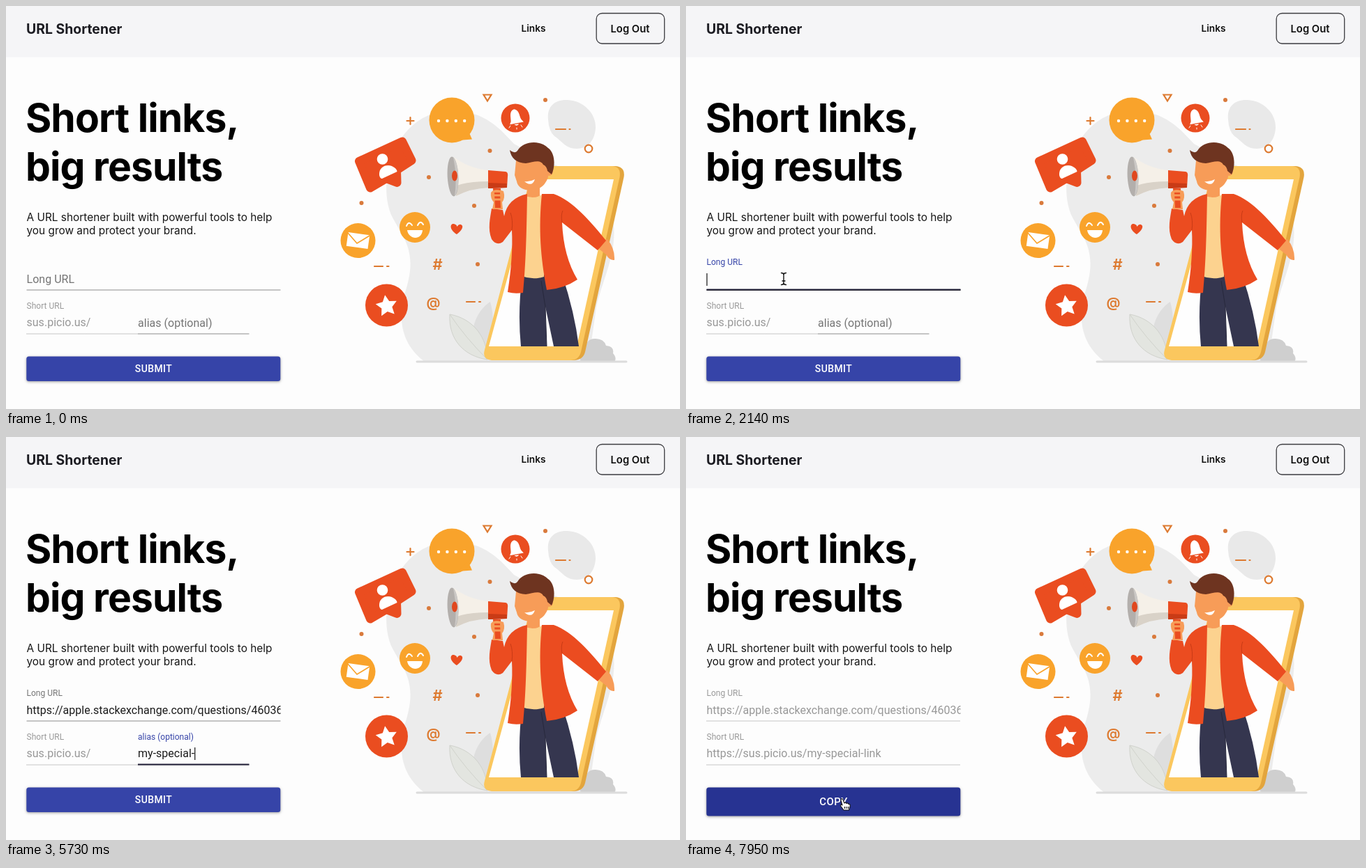
An HTML page that plays this animation: 966x579 px, repeating every 8000 ms.

```html
<!DOCTYPE html>
<html lang="en">
<head>
<meta charset="utf-8">
<title>URL Shortener</title>
<style>
  html, body { margin: 0; width: 100%; height: 100%; overflow: hidden; background: #fdfdfd; }
  svg { display: block; width: 966px; height: 579px; }
  text { font: 16px Roboto, sans-serif; letter-spacing: .02px; white-space: pre; }
  .inter { font-family: Inter, sans-serif; font-weight: 600; letter-spacing: 0; font-optical-sizing: none; fill: #111; }
  .title { font-size: 57px; font-weight: 700; letter-spacing: -.95px; fill: #000; }
  .lead { font-size: 15.4px; font-weight: 400; fill: #161616; }
  .small { font-size: 12px; fill: #999; }
  .cap { font-weight: 500; letter-spacing: .4px; fill: #fff; text-anchor: middle; }
  .sign { font: 600 22px Inter, sans-serif; fill: #dd7a30; text-anchor: middle; }
  .dots { stroke: #8c8c8c; stroke-dasharray: 1 1; }
  #button { filter: drop-shadow(0 1px 2px rgba(0, 0, 0, .25)) drop-shadow(0 1.5px 1px rgba(0, 0, 0, .15)); }
</style>
</head>
<body>
<svg viewBox="0 0 966 579">
  <defs><clipPath id="field"><path d="M29 375H393.500V406H29Z"/></clipPath></defs>
  <path fill="#f5f5f7" d="M0 0H966V73.500H0Z"/>
  <text class="inter" x="29" y="39.500" style="font-size:19.400px;font-weight:700;fill:#1c1c22">URL Shortener</text>
  <text class="inter" x="738.500" y="36.500" style="font-size:13.700px">Links</text>
  <rect x="846.200" y="10.500" width="97.500" height="43.500" rx="8" fill="none" stroke="#3c3c40" stroke-width="1.300"/>
  <text class="inter" x="866.500" y="37.500" style="font-size:14.800px">Log Out</text>
  <text class="inter title" x="28" y="181">Short links,</text>
  <text class="inter title" x="28" y="250.500">big results</text>
  <text class="inter lead" x="29.500" y="309">A URL shortener built with powerful tools to help</text>
  <text class="inter lead" x="29.500" y="328">you grow and protect your brand.</text>

  <!-- backdrop -->
  <g fill="#ececec">
    <path d="M600 511C565 485 560 445 574 405C590 350 568 332 552 300C532 250 556 165 622 152C680 143 708 176 728 198C790 232 850 250 868 300C882 350 850 400 845 440L835 511Z"/>
    <path fill="#e9e9e9" d="M777 163C775 143 788 134 805 135C828 136 846 155 845 175C844 194 833 205 818 205C802 205 797 194 786 187Q778 180 777 163Z"/>
    <path fill="#dedede" d="M668 470C672 446 682 433 694 425C700 445 699 470 692 492Z"/>
    <path fill="#e3e5e0" stroke="#d0d2cc" d="M636 443C634 479 656 503 690 508C690 477 670 449 636 443Q658 476 690 508"/>
    <path fill="#cfcfcf" d="M824 511Q818 497 830 493Q832 477 845 478Q857 478 860 488Q872 489 870 499Q876 506 872 511Z"/>
  </g>
  <path d="M589 511H889" stroke="#dcdcdc" stroke-width="3" stroke-linecap="round"/>

  <!-- badges -->
  <g fill="#f9a32b">
    <circle cx="639" cy="164" r="32.500"/>
    <path d="M648 193L668 191.500L662 178Z"/>
    <circle cx="586" cy="318" r="22"/>
    <circle cx="504.500" cy="337" r="25"/>
  </g>
  <g fill="#ea4d20">
    <circle cx="730" cy="161" r="20.500"/>
    <circle cx="545.500" cy="430" r="30.500"/>
    <path stroke="#ea4d20" stroke-width="12" stroke-linejoin="round" d="M506 223L568 194.500L581.500 222L560 236L560.500 254L545 248L522 261.500Z"/>
    <path d="M646 328C634 320 637 312 642 313Q646 314 646.500 317Q649 313 652 314C657 316 653 323 646 328Z"/>
  </g>
  <g fill="#fff">
    <g id="ellipsis"></g>
    <circle cx="539.500" cy="220" r="7.800"/>
    <path d="M535 243C534 231 545 227 553 230Q560 233 560.500 238L539 248Q536 248 535 243Z"/>
    <path transform="rotate(-8 730 161)" d="M730 148C737 150 736 158 738 164L741 168L721 169L723 165C724 158 722 150 730 148ZM727 170H734Q731 174 727 170Z"/>
    <path d="M575 322H597C596 337 577 336 575 322Z"/>
    <path transform="rotate(8 504.500 337)" d="M489 327H520V347H489Z"/>
    <path id="star"/>
  </g>
  <g fill="none" stroke-linecap="round">
    <path d="M574 316Q577 308 582 315M590 315Q594 307 598 314" stroke="#fff" stroke-width="2"/>
    <path d="M490 326L503 341L521 330" stroke="#f9a32b" stroke-width="1.700"/>
    <path d="M723 172L721 175M738 171L740 174M732 175V177" stroke="#fff"/>
    <g stroke="#dd7a30" stroke-width="2.200">
      <path d="M528 374H540M546 374H548.500M660 425H672M678 425H680M788 177H802M807.500 177H808.500M574.500 165H584.500M579.500 160V170M684.500 127.500H695.500L690 136.500Z"/>
      <circle cx="835" cy="205" r="5.300"/>
    </g>
  </g>
  <g id="specks" fill="#d97a3c"></g>
  <text class="sign" x="618.500" y="379">#</text>
  <text class="sign" x="612.500" y="432.500" style="font-size:20px">@</text>

  <!-- phone -->
  <path fill="#e3a53d" d="M765 230H873Q888 231 885.500 246L830 497Q827 509 813 509H700Z"/>
  <path fill="#fbc75e" d="M756 230H869Q882 231 879.500 246L824 497Q821 509 809 509H696Q682 508 686 494Z"/>
  <path fill="#fefefe" d="M757 249H871L818 489H692Z"/>

  <!-- man -->
  <path fill="#35364f" d="M740 386H797Q815 440 821 489H785L773 432L775 489H738Q733 440 740 386Z"/>
  <path d="M773 432L767 395M775 489L773 432" stroke="#27283c"/>
  <path fill="#f79c58" d="M848 340L862 335Q873 349 872 365Q865 366 860 357L851 350ZM748 250H765V279H746Z"/>
  <path fill="#fcd28f" d="M743 272Q756 279 770 270L771 389Q755 394 739 388Z"/>
  <g fill="#eb4c20">
    <path d="M747 270C746 330 745 370 741 412Q729 414 719 411Q727 360 725 322L712 339Q703 345 696 335C690 320 694 304 696 291L712 293L714 302Q719 276 747 270Z"/>
    <path d="M768 270H785C812 279 840 312 860 337L848 351L797 311Q799 360 819 393Q800 406 775 408C766 360 763 320 768 270Z"/>
  </g>
  <path fill="none" stroke="#c93b16" d="M725 322Q727 308 723 297M797 311Q795 300 798 294"/>
  <path fill="#f79c58" d="M731 222Q750 212 776 224L777 246Q771 264 752 265Q734 264 732 252L729 243Z"/>
  <circle cx="778" cy="238" r="6" fill="#f79c58"/>
  <path fill="#6e3420" d="M722 207Q729 213 733 208C741 194 765 192 777 204C788 212 787 232 782 242L776 237Q775 230 770 228C766 220 756 224 745 226Q725 225 722 207Z"/>
  <path fill="#fff" d="M743 252Q751 253 758 249Q754 261 743 252Z"/>

  <!-- megaphone -->
  <path fill="#f5f0e8" d="M642 217Q662 233 692 236V261Q666 261 646 273Z"/>
  <path fill="#d9d2c8" d="M645 273Q666 262 692 261V252Q662 252 646 258Z"/>
  <ellipse cx="640.500" cy="245" rx="7.800" ry="28.500" fill="#b3afac" transform="rotate(-3 640 245)"/>
  <path fill="#cbc8c5" d="M641 217C650 225 651 263 643 273Q647 245 641 217Z"/>
  <ellipse cx="643" cy="244" rx="4" ry="7.500" fill="#e0481f"/>
  <path fill="#ea4d20" d="M691 236L716 238Q720 239 719 245L718 261L691 262ZM698 262H709L710 290H700Z"/>
  <path fill="#c93b16" d="M691 254L718 255V261L691 262Z"/>
  <path fill="#f79c58" d="M695 268Q700 261 713 266Q716 276 711 282L712 292H697L699 282Q694 276 695 268Z"/>
  <path fill="#ea4d20" d="M700 268H708L709 290H701Z"/>
  <path d="M700 272H712M700 278H711" stroke="#f79c58" stroke-width="3"/>

  <!-- form -->
  <text id="longLabel">Long URL</text>
  <text id="longText" x="29.500" y="397.700" clip-path="url(#field)">https://apple.stackexchange.com/questions/460365/</text>
  <path id="longLine"/>
  <path id="longFocus" stroke="#24223a" stroke-width="2"/>
  <text class="small" x="29.500" y="435.300">Short URL</text>
  <text id="shortText" x="29.500" y="460.300" fill="#989898"></text>
  <path id="shortLine" class="dots"/>
  <g id="alias">
    <path d="M189 471H348.500" stroke="#8c8c8c"/>
    <path id="aliasFocus" stroke="#24223a" stroke-width="2"/>
    <text id="aliasLabel">alias (optional)</text>
    <text id="aliasText" x="189" y="460.300" fill="#1c1c1c"></text>
  </g>
  <path id="caret" stroke="#111" stroke-width="1.200"/>
  <rect id="button" x="29.300" y="503.500" width="364" rx="3.500"/>
  <text id="caption" class="cap" x="211.500"></text>

  <g id="pointer" stroke-linejoin="round">
    <g id="beam" fill="none" stroke-linecap="round">
      <path stroke="#fff" stroke-width="3" d="M-3.500 -8.500Q0 -8.500 0 -6Q0 -8.500 3.500 -8.500M0 -6V6M-3.500 8.500Q0 8.500 0 6Q0 8.500 3.500 8.500M-2 3H2"/>
      <path stroke="#111" stroke-width="1.400" d="M-3.500 -8.500Q0 -8.500 0 -6Q0 -8.500 3.500 -8.500M0 -6V6M-3.500 8.500Q0 8.500 0 6Q0 8.500 3.500 8.500M-2 3H2"/>
    </g>
    <g id="hand" fill="#fff" stroke="#111" stroke-width="1.100">
      <path d="M-4 1L-6 -6Q-6 -9 -3.500 -8L-1 -2Q1 -4 2 -1.500Q4 -3 5 -.500Q8 -1 7 3L5.500 8H-2L-6.500 2Q-6.500 -1 -4 1Z"/>
      <path d="M-.500 3V6M2 3V6M4.500 3V6"/>
    </g>
    <path id="arrow" fill="#111" stroke="#fff" d="M0 0V15L3.500 11.800L6 17.500L8.500 16.300L6 11H11Z"/>
  </g>
</svg>
<script>
const $ = id => document.getElementById(id);
const set = (id, attrs) => { for (const k in attrs) $(id).setAttribute(k, attrs[k]); };
const show = (id, on) => set(id, { visibility: on ? 'visible' : 'hidden' });
const clamp = p => Math.max(0, Math.min(1, p));
const easeOut = p => 1 - (1 - clamp(p)) ** 3;
const easeInOut = p => p * p * (3 - 2 * p);

const circles = list => list.map(([x, y, r]) => `<circle cx="${x}" cy="${y}" r="${r}"/>`).join('');
$('ellipsis').innerHTML = circles([0, 1, 2, 3].map(i => [620 + i * 12.4, 165, 2.2]));
$('specks').innerHTML = circles([[773, 135, 3], [693.5, 208, 3], [606, 246, 3], [509.5, 283, 3], [671, 287, 3], [676, 371, 3]]);
const star = Array.from({ length: 10 }, (_, i) => {
  const a = i * Math.PI / 5 - 1.72, r = i % 2 ? 8 : 16;
  return [545.5 + r * Math.cos(a), 431 + r * Math.sin(a)];
});
set('star', { d: 'M' + star.join('L') + 'Z' });

const LOOP = 8000, FOCUS = 1780, PASTE = 2650, NEXT = 3400, HOVER = 7080, DONE = 7450;
const WORD = 'my-special-link';
const KEYS = [4140, 4260, 4400, 4600, 4910, 5030, 5150, 5270, 5390, 5500, 5620, 5740, 5900, 6080, 6250];
// time, x, y
const TRACK = [[860, 262, 470], [1350, 142, 391], [1700, 142, 391], [1800, 140, 392], [2950, 140, 392],
  [3360, 255, 449], [6550, 255, 449], [6750, 249, 453], [6820, 249, 453], [7220, 228, 528]];

function pointerAt(t) {
  const i = TRACK.findIndex(k => k[0] > t);
  if (i < 1) return TRACK[i < 0 ? TRACK.length - 1 : 0].slice(1);
  const [a, b] = [TRACK[i - 1], TRACK[i]];
  const p = easeInOut((t - a[0]) / (b[0] - a[0]));
  return [1, 2].map(j => a[j] + (b[j] - a[j]) * p);
}

const progress = (t, start) => easeOut((t - start) / 200);
const mix = (a, b, p) => `rgb(${a.map((v, i) => Math.round(v + (b[i] - v) * p))})`;
const GREY = [117, 117, 117], BLUE = [54, 68, 168];

function label(id, x, y, lift, tint) {
  set(id, {
    transform: `translate(${x} ${y - 25.4 * lift}) scale(${1 - lift / 4})`,
    fill: mix(GREY, BLUE, tint)
  });
}

function focusLine(id, mid, half, y, p) {
  show(id, p > 0.002);
  set(id, { d: `M${mid - half * p} ${y}H${mid + half * p}` });
}

function draw(t) {
  const [x, y] = pointerAt(t);
  const done = t >= DONE;
  const typing = (t >= PASTE && t < 2950) || (t >= KEYS[0] && t < 6550);
  const visible = t >= TRACK[0][0] && !typing;
  const overLong = visible && y > 377 && y < 409;
  const overAlias = visible && x > 188 && x < 349 && y > 440 && y < 472;
  const overButton = y > 503;

  const first = progress(t, FOCUS), second = progress(t, NEXT), blur = progress(t, DONE);
  label('longLabel', 29.5, 397.7, first, first - second);
  if (done) set('longLabel', { fill: '#999' });
  focusLine('longFocus', 211.5, 182, 407.5, first - second);
  show('longText', t >= PASTE);
  set('longText', { fill: done ? '#989898' : '#1c1c1c' });
  const hot = overLong && !done;
  set('longLine', {
    d: 'M29.5 408H393.5', class: done ? 'dots' : '',
    stroke: hot ? '#4a4a4a' : '#8c8c8c', 'stroke-width': hot ? 1.8 : 1
  });

  const count = KEYS.filter(k => k <= t).length;
  $('aliasText').textContent = WORD.slice(0, count);
  label('aliasLabel', 189, 460.7, second, second - blur);
  focusLine('aliasFocus', 268.75, 79.75, 470.5, second);
  $('alias').style.display = done ? 'none' : '';
  $('shortText').textContent = done ? 'https://sus.picio.us/' + WORD : 'sus.picio.us/';
  set('shortLine', { d: `M29.5 471H${done ? 393.5 : 189}` });

  // The caret restarts its blink after every key.
  const inAlias = t >= NEXT, pasted = t >= PASTE;
  const since = t - (count ? KEYS[count - 1] : inAlias ? NEXT : pasted ? PASTE : FOCUS);
  show('caret', t >= FOCUS && !done && (inAlias || !pasted) && since % 1000 < 500);
  const cx = inAlias ? 189.5 + (count ? $('aliasText').getComputedTextLength() : 0) : 30;
  set('caret', { d: `M${cx} ${inAlias ? 446 : 384}v18` });

  const shade = clamp((t - HOVER) / 250);
  set('button', { height: done ? 41 : 35.5, fill: mix(BLUE, [39, 51, 146], shade) });
  set('caption', { y: done ? 529.3 : 526 });
  $('caption').style.fontSize = done ? '15px' : '14px';
  $('caption').textContent = done ? 'COPY' : 'SUBMIT';

  $('pointer').style.display = visible ? '' : 'none';
  set('pointer', { transform: `translate(${x} ${y})` });
  const text = overLong || overAlias;
  show('beam', text);
  show('hand', overButton);
  show('arrow', !text && !overButton);
}

const start = performance.now();
function tick(now) {
  draw(Math.max(0, now - start) % LOOP);
  requestAnimationFrame(tick);
}
draw(0);
requestAnimationFrame(tick);
</script>
</body>
</html>
```
